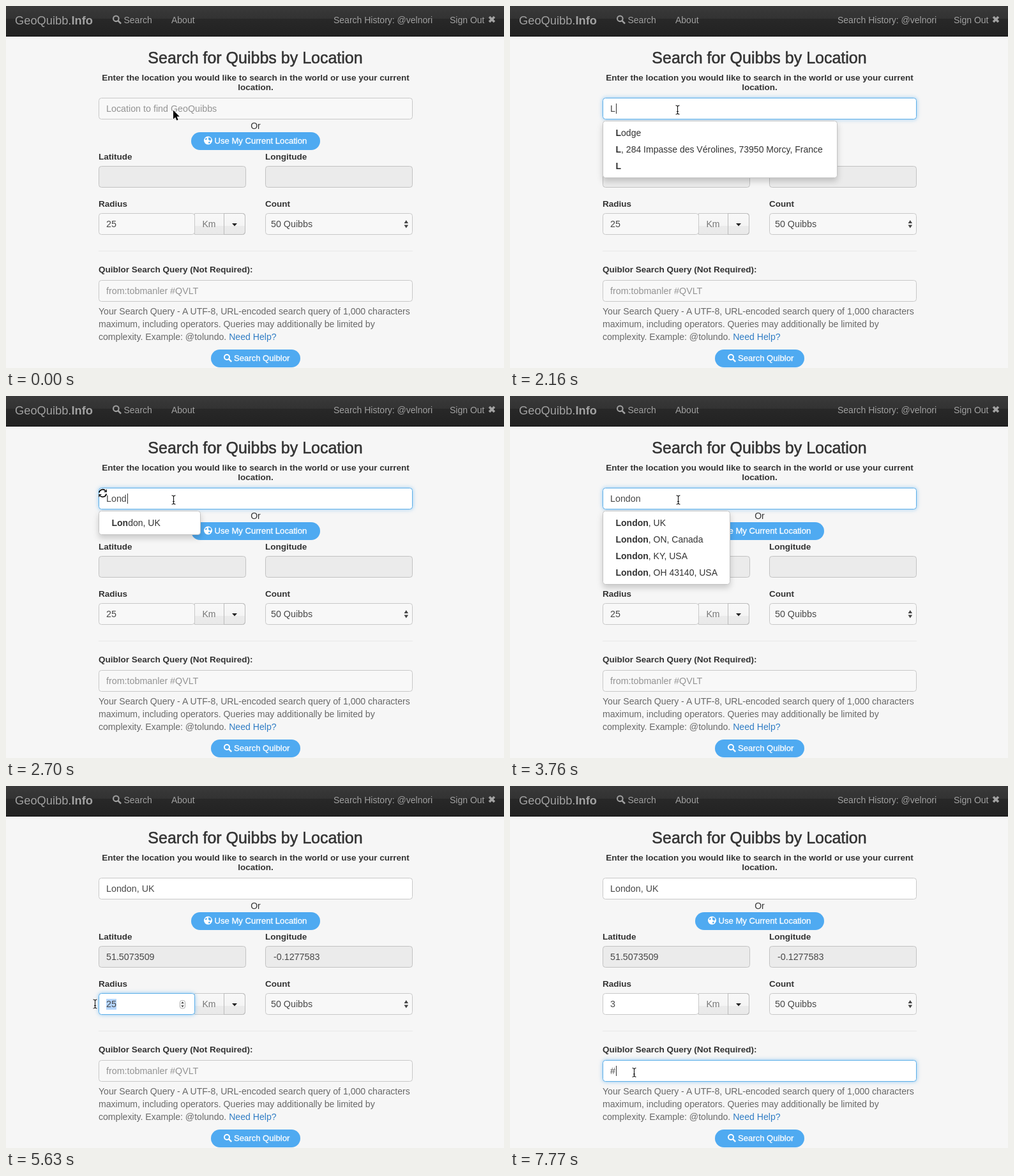
Write an HTML page that moves like this. It is 780 by 568 pixels and loops after 8 s.

```html
<!DOCTYPE html>
<html lang="en">
<head>
<meta charset="utf-8">
<title>Location search</title>
<style>
html, body { margin: 0; width: 100%; height: 100%; overflow: hidden; background: #f6f6f6; }
svg { display: block; font: 14px "Liberation Sans", Arial, sans-serif; fill: #333; }
.nav { fill: #a2a2a2; color: #a2a2a2; }
.bold { font-weight: bold; }
.mid { text-anchor: middle; }
.title { font-size: 25px; stroke: #333; stroke-width: .55px; }
.lead, .label { font-size: 13.5px; }
.box { fill: #f8f8f8; stroke: #c8c8c8; }
.off { fill: #ebebeb; stroke: #c2c2c2; }
.in { font-size: 14.3px; fill: #484848; }
.help { font-size: 14.08px; fill: #686868; }
.pill { fill: #4faaf1; }
.pilltext { font-size: 13.1px; fill: #fff; stroke: #fff; stroke-width: .3px; }
.menu { fill: #fff; stroke: #c4c4c4; filter: drop-shadow(0 5px 5px rgba(0,0,0,.18)); }
.line { fill: none; stroke: currentColor; }
</style>
</head>
<body>
<svg width="780" height="568" viewBox="0 0 780 568">
  <defs>
    <linearGradient id="bar" x2="0" y2="1">
      <stop offset="0" stop-color="#3a3a3a"/><stop offset=".42" stop-color="#323232"/>
      <stop offset=".42" stop-color="#282828"/><stop offset="1" stop-color="#222"/>
    </linearGradient>
    <linearGradient id="btn" x2="0" y2="1">
      <stop offset="0" stop-color="#f8f8f8"/><stop offset=".6" stop-color="#f4f4f4"/>
      <stop offset=".6" stop-color="#ebebeb"/><stop offset="1" stop-color="#e9e9e9"/>
    </linearGradient>
    <g id="lens" class="line"><circle cx="5" cy="5" r="4" stroke-width="1.9"/><path d="M8 8l4.2 4.2" stroke-width="2.4"/></g>
    <path id="bar-i" d="M-3-7Q0-7 0-4.5Q0-7 3-7M0-4.5V4.5M-3 7Q0 7 0 4.5Q0 7 3 7M-1.5 2.5H1.5"/>
  </defs>

  <rect width="780" height="47" fill="url(#bar)"/>
  <rect y="47" width="780" height="1" fill="#111"/>
  <g class="nav">
    <text x="14" y="29" font-size="18.3">GeoQuibb.<tspan class="bold">Info</tspan></text>
    <use href="#lens" transform="translate(167 14.5) scale(1.07)"/>
    <text x="184.5" y="27">Search</text>
    <text x="259" y="27">About</text>
    <text x="513" y="27">Search History: @velnori</text>
    <text x="695" y="27">Sign Out</text>
    <path class="line" d="M757 17l8 8m0-8l-8 8" stroke-width="3.6"/>
  </g>

  <text class="title mid" x="390.5" y="90">Search for Quibbs by Location</text>
  <g class="lead bold mid">
    <text x="391" y="117">Enter the location you would like to search in the world or use your current</text>
    <text x="391" y="132">location.</text>
  </g>
  <text class="mid" x="391" y="193">Or</text>
  <rect class="pill" x="290" y="198" width="202" height="28" rx="14"/>
  <circle cx="316.5" cy="211" r="6.5" fill="#fff"/>
  <path class="pill" d="M311.5 209l2-2 1.5 1-1.5 2.5zM317 206l3.5 1 1 3-2 1.5-2.5-2zM317.5 213l2.5 0-1.5 3-1.5-1z"/>
  <text class="pilltext" x="326.5" y="216">Use My Current Location</text>

  <g class="label bold">
    <text x="145" y="241">Latitude</text><text x="406" y="241">Longitude</text>
    <text x="145" y="315">Radius</text><text x="406" y="315">Count</text>
    <text x="145" y="418">Quiblor Search Query (Not Required):</text>
  </g>
  <rect class="off" x="145.5" y="251.5" width="230" height="33" rx="4"/>
  <rect class="off" x="406.5" y="251.5" width="230" height="33" rx="4"/>
  <text class="in" id="lat" x="157" y="273"></text>
  <text class="in" id="lng" x="419" y="273"></text>

  <path d="M295.5 325.5h75q4 0 4 4v25q0 4-4 4h-75z" fill="url(#btn)" stroke="#c8c8c8"/>
  <path d="M341.5 325.5h29q4 0 4 4v25q0 4-4 4h-29z" fill="none" stroke="#bbb"/>
  <text class="mid" x="318" y="347" fill="#777">Km</text>
  <path d="M354 341h8l-4 4.5z" fill="#222"/>
  <rect class="box" x="406.5" y="325.5" width="230" height="33" rx="4"/>
  <text class="in" x="415" y="347">50 Quibbs</text>
  <path d="M623.5 341l3.3-5 3.3 5zM623.5 343.5h6.6l-3.3 5z" fill="#444"/>
  <path d="M145 384.5h492" stroke="#e8e8e8"/>

  <g class="help">
    <text x="145" y="484">Your Search Query - A UTF-8, URL-encoded search query of 1,000 characters</text>
    <text x="145" y="504">maximum, including operators. Queries may additionally be limited by</text>
    <text x="145" y="524">complexity. Example: @tolundo. <tspan fill="#2f7cc4">Need Help?</tspan></text>
  </g>
  <rect class="pill" x="321" y="539" width="140" height="28" rx="14"/>
  <use href="#lens" x="341" y="546" color="#fff"/>
  <text class="pilltext" x="357" y="557">Search Quiblor</text>

  <g id="fields"></g>
  <g id="stepper">
    <rect x="272.5" y="336.5" width="8" height="12.5" rx="3" fill="#fff" stroke="#aaa"/>
    <path d="M274.2 341.3l2.3-3 2.3 3zM274.2 344.3h4.6l-2.3 3z" fill="#444"/>
  </g>
  <g id="busy" class="line" transform="translate(151.5 152.5)" stroke="#333" stroke-width="1.7">
    <path d="M-5.7-1A5.8 5.8 0 0 1 4.2-4M5.7 1A5.8 5.8 0 0 1-4.2 4"/>
    <path d="M6.5-6.5v5h-5zM-6.5 6.5v-5h5z" fill="#333" stroke="none"/>
  </g>
  <g id="list"></g>
  <path id="arrow" d="M0 0V14L3.2 11 5.4 16 7.7 15 5.5 10.1H9.8z" fill="#000" stroke="#fff" stroke-width="1.4" paint-order="stroke"/>
  <g id="beam" class="line">
    <use href="#bar-i" stroke="#fff" stroke-width="2.6"/>
    <use href="#bar-i" stroke="#111" stroke-width="1.1"/>
  </g>
</svg>
<script>
const $ = id => document.getElementById(id);

const fields = {
  place: { y: 144, w: 492, hint: 'Location to find GeoQuibbs' },
  radius: { y: 325, w: 151, hint: '' },
  query: { y: 430, w: 492, hint: 'from:tobmanler #QVLT' }
};

const menus = {
  one: { w: 367, bold: 1, items: ['Lodge', 'L, 284 Impasse des Vérolines, 73950 Morcy, France', 'L'] },
  three: { w: 159, bold: 3, items: ['London, UK'] },
  four: { w: 281, bold: 4, items: ['London, UK', 'Londonderry, County Londonderry, UK', 'London, ON, Canada', 'London, KY, USA'] },
  six: { w: 199, bold: 6, items: ['London, UK', 'London, ON, Canada', 'London, KY, USA', 'London, OH 43140, USA'] }
};

const start = {
  place: '', radius: '25', query: '', focus: '', glow: 0, caret: false, menu: '', hover: false,
  busy: false, stepper: false, selected: false, found: false, cursor: ['arrow', 262, 163.5]
};

// Each step changes part of the state from its time on.
const steps = [
  [810, { cursor: ['beam', 262.5, 163] }],
  [1080, { focus: 'place', glow: .5, caret: true }],
  [1350, { glow: 1 }],
  [1890, { place: 'L', busy: true }],
  [2160, { menu: 'one', busy: false }],
  [2430, { place: 'Lon', menu: 'three' }],
  [2700, { place: 'Lond', busy: true }],
  [2960, { place: 'Londo', menu: 'four' }],
  [3230, { place: 'London', menu: 'six', busy: false }],
  [3760, { caret: false, cursor: ['beam', 263.5, 163] }],
  [4030, { cursor: ['arrow', 266, 185] }],
  [4290, { caret: true, hover: true, cursor: ['arrow', 257, 195.5] }],
  [4560, { place: 'London, UK', focus: '', menu: '', hover: false, found: true }],
  [4830, { cursor: ['beam', 240.5, 331] }],
  [5090, { cursor: ['beam', 219.5, 359] }],
  [5360, { stepper: true, cursor: ['beam', 177.5, 342] }],
  [5630, { focus: 'radius', glow: 1, caret: false, selected: true, cursor: ['beam', 139.5, 342] }],
  [5900, { cursor: ['beam', 134.5, 342] }],
  [6160, { cursor: ['arrow', 137, 343] }],
  [6430, { radius: '3', caret: true, selected: false, cursor: ['arrow', 183, 399] }],
  [6690, { caret: false, cursor: ['beam', 194.5, 449.5] }],
  [6960, { focus: 'query', glow: .5, caret: true, stepper: false }],
  [7230, { glow: 1 }],
  [7770, { query: '#' }]
];

function add(parent, tag, attrs, text = '') {
  const el = document.createElementNS('http://www.w3.org/2000/svg', tag);
  for (const k in attrs) el.setAttribute(k, attrs[k]);
  el.textContent = text;
  return parent.appendChild(el);
}

function drawField(name, s) {
  const { y, w, hint } = fields[name], g = $('fields'), value = s[name], on = s.focus === name;
  const box = add(g, 'rect', { class: 'box', x: 145.5, y: y + .5, width: w - 1, height: 33, rx: 4 });
  if (on || value !== start[name]) box.style.fill = '#fff';
  if (on) {
    box.style.stroke = s.glow < 1 ? '#8fc0e4' : '#5cafe9';
    box.style.filter = `drop-shadow(0 0 3px rgba(90,175,240,${.65 * s.glow}))`;
  }
  if (on && s.selected) add(g, 'rect', { x: 157, y: y + 9, width: 16, height: 17, fill: '#b4d5fe' });
  const text = add(g, 'text', { class: 'in', x: 157, y: y + 22 }, value || hint);
  if (!value) text.style.fill = '#939393';
  if (on && s.caret) {
    const x = 157 + (value ? Math.round(text.getComputedTextLength() + 1) : 0);
    add(g, 'rect', { x, y: y + 9, width: 1, height: 16, fill: '#333' });
  }
}

function drawMenu(s) {
  const g = $('list'), menu = menus[s.menu];
  g.replaceChildren();
  if (!menu) return;
  add(g, 'rect', { class: 'menu', x: 145.5, y: 180.5, width: menu.w, height: 11 + 26 * menu.items.length, rx: 4 });
  if (s.hover) add(g, 'rect', { x: 146, y: 186, width: menu.w - 1, height: 26, fill: '#f5f5f5' });
  menu.items.forEach((item, i) => {
    const line = add(g, 'text', { x: 165.5, y: 204 + 26 * i });
    add(line, 'tspan', { class: 'bold' }, item.slice(0, menu.bold));
    add(line, 'tspan', {}, item.slice(menu.bold));
  });
}

function show(id, on) { $(id).style.display = on ? '' : 'none'; }

function draw(s) {
  $('fields').replaceChildren();
  Object.keys(fields).forEach(name => drawField(name, s));
  drawMenu(s);
  show('busy', s.busy);
  show('stepper', s.stepper);
  $('lat').textContent = s.found ? '51.5073509' : '';
  $('lng').textContent = s.found ? '-0.1277583' : '';
  const [kind, x, y] = s.cursor;
  ['arrow', 'beam'].forEach(id => show(id, id === kind));
  $(kind).setAttribute('transform', `translate(${x} ${y})`);
}

let last = -1;
function tick() {
  const t = performance.now() % 8000;
  const past = steps.filter(step => step[0] <= t);
  if (past.length !== last) {
    last = past.length;
    draw(Object.assign({}, start, ...past.map(step => step[1])));
  }
  requestAnimationFrame(tick);
}
tick();
</script>
</body>
</html>
```
